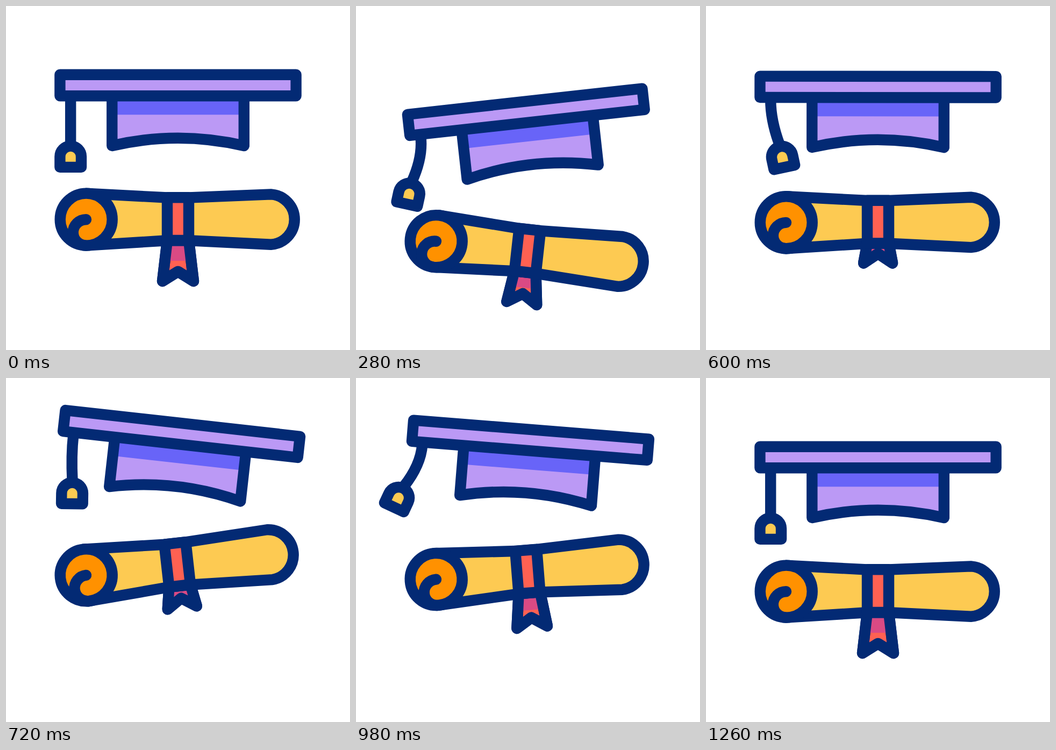
Recreate the animation shown at these times as an HTML page. Size 640 px wide and 640 px high, loop 1820 ms.

```html
<!DOCTYPE html>
<html lang="en">
<head>
<meta charset="utf-8">
<title>Graduation</title>
<style>
  html, body { margin: 0; width: 100%; height: 100%; overflow: hidden; background: #fff; }
  svg { display: block; width: 100vw; height: 100vh; }
  .line { stroke: #032a74; stroke-width: 20.4; stroke-linejoin: round; stroke-linecap: round; }
</style>
</head>
<body>
<svg viewBox="0 0 640 640" fill="none">
  <g id="scroll">
    <path id="tail" class="line" fill="#ff6152"/>
    <path id="tailShade" fill="#da4a84"/>
    <path id="tailLine" class="line"/>
    <path class="line" fill="#fdca52" d="M149 348.6 300 356.5H340L493 350.4A46.8 46.8 0 0 1 493 443.8L340 436.3H300L149 445.6Z"/>
    <circle class="line" fill="#ff9100" cx="149.2" cy="397.1" r="48.5"/>
    <path class="line" d="M149 397.2a24.2 24.2 0 0 0 0 48.4"/>
    <path class="line" fill="#ff6152" d="M300 356.3H340V436H300Z"/>
  </g>
  <g id="cap">
    <path id="string" class="line"/>
    <path id="bob" class="line" fill="#fdca52" d="M100.4 299.9V280.3a19.8 19.8 0 0 1 39.6 0V299.9Z"/>
    <path fill="#bb99f5" d="M197.3 167H442.8V260Q320 231.5 197.3 260Z"/>
    <path fill="#6864f8" d="M197.3 167H442.8V202.3H197.3Z"/>
    <path class="line" d="M197.3 167V260Q320 231.5 442.8 260V167"/>
    <path class="line" fill="#bb99f5" d="M100.4 127.8H539.6V167.2H100.4Z"/>
  </g>
</svg>
<script>
const LOOP = 1820;
const el = id => document.getElementById(id);
const set = (id, name, value) => el(id).setAttribute(name, value);

// Eased travel between [time, value] keys, resting at each key.
function ease(keys, t) {
  const i = keys.findIndex(k => k[0] > t);
  if (i < 0) return keys[keys.length - 1][1];
  const [t0, a] = keys[i - 1], [t1, b] = keys[i];
  const u = (t - t0) / (t1 - t0);
  return a + (b - a) * u * u * (3 - 2 * u);
}

// Smooth curve running through the keys without stopping.
function spline(keys, t) {
  const i = keys.findIndex(k => k[0] > t);
  if (i < 0) return keys[keys.length - 1][1];
  const slope = j => (keys[j + 1][1] - keys[j][1]) / (keys[j + 1][0] - keys[j][0]);
  const tangent = j => {
    if (j === 0 || j === keys.length - 1) return 0;
    const h0 = keys[j][0] - keys[j - 1][0], h1 = keys[j + 1][0] - keys[j][0];
    return (slope(j - 1) * h1 + slope(j) * h0) / (h0 + h1);
  };
  const [t0, a] = keys[i - 1], [t1, b] = keys[i];
  const h = t1 - t0, u = (t - t0) / h, s = u * u * (3 - 2 * u);
  return a + (b - a) * s
    + h * u * (1 - u) * (tangent(i - 1) * (1 - u) - tangent(i) * u);
}

const beat = (down, up) => [[0, 0], [400, down], [800, up], [1200, 0]];
const TILT = beat(8, -8);
const SCROLL_Y = beat(51.5, -39.5);
const CAP_Y = beat(30, -23);
const SHRINK = [[0, 0], [600, 39], [1200, 0]];
const SWING = [[0, 0], [160, 17.6], [220, 21.5], [420, 0], [590, -12],
               [860, 9], [975, 20.5], [1100, 8.5], [1180, 1], [1260, 0]];

function draw(now) {
  const t = now % LOOP;
  const tilt = ease(TILT, t);
  set('scroll', 'transform', `translate(0 ${ease(SCROLL_Y, t)}) rotate(${tilt} 149 397)`);
  set('cap', 'transform', `translate(0 ${ease(CAP_Y, t)}) rotate(${-tilt} 556 194)`);

  const up = ease(SHRINK, t), inset = up / 20, tip = 512 - up;
  const tail = `M300 436L${291 + inset} ${tip} 320 ${tip - 18} ${349 - inset} ${tip} 340 436Z`;
  set('tail', 'd', tail);
  set('tailLine', 'd', tail);
  set('tailShade', 'd', `M300 436H340V${474 - up / 2}H300Z`);

  const swing = spline(SWING, t), rad = swing * Math.PI / 180;
  set('bob', 'transform', `rotate(${swing} 120.2 177)`);
  set('string', 'd', `M120.2 172Q120.2 210 ${120.2 - 80 * Math.sin(rad)} ${177 + 80 * Math.cos(rad)}`);
}

function frame() {
  draw(performance.now());
  requestAnimationFrame(frame);
}
frame();
</script>
</body>
</html>
```
